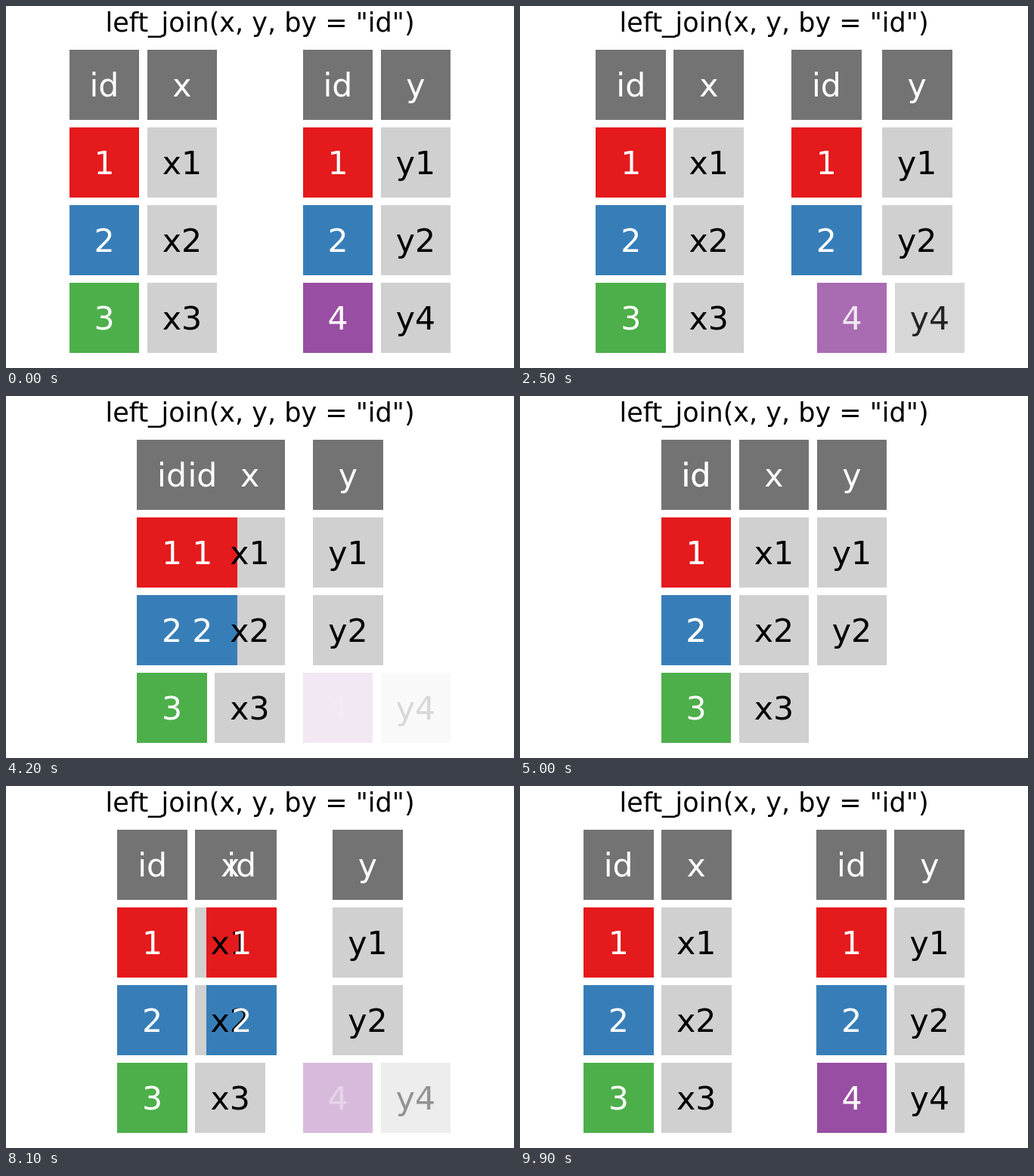
Animation, 672 px wide and 480 px high, one loop 10 s. Source, as an HTML page:

```html
<!DOCTYPE html>
<html lang="en">
<head>
<meta charset="utf-8">
<title>Left join</title>
<style>
  html, body { margin: 0; width: 100%; height: 100%; overflow: hidden; background: #fff; }
  svg { display: block; width: 672px; height: 480px; }
  text { font: 42.68px "DejaVu Sans", sans-serif; text-anchor: middle; }
  .title { font-size: 35px; }
  rect { shape-rendering: crispEdges; }
</style>
</head>
<body>
<svg viewBox="0 0 672 480">
  <text class="title" x="336" y="34">left_join(x, y, by = "id")</text>
  <g id="tiles"></g>
  <g id="labels"></g>
</svg>
<script>
const PITCH = 103, SIZE = 92.7, LEFT = 83.65, TOP = 58;
const STEP = 100, STEPS = 100;
const HEAD = '#737373', CELL = '#d0d0d0';
const KEYS = { 1: '#e41a1c', 2: '#377eb8', 3: '#4daf4a', 4: '#984ea3' };

// slot: starting column, move: columns travelled during the join
const columns = [
  { slot: 0, move: 1, rows: ['id', '1', '2', '3'] },
  { slot: 1, move: 1, rows: ['x', 'x1', 'x2', 'x3'] },
  { slot: 3, move: -2, rows: ['id', '1', '2', '4'] },
  { slot: 4, move: -1, rows: ['y', 'y1', 'y2', 'y4'] }
];

function add(parent, tag, attrs) {
  const el = document.createElementNS('http://www.w3.org/2000/svg', tag);
  for (const name in attrs) el.setAttribute(name, attrs[name]);
  return document.getElementById(parent).appendChild(el);
}

function makeCell(label, row, { slot, move }) {
  const y = TOP + row * PITCH;
  const fill = row === 0 ? HEAD : KEYS[label] || CELL;
  const tile = add('tiles', 'rect', { y, height: 93, fill });
  const text = add('labels', 'text', { y: y + 62, fill: fill === CELL ? '#000' : '#fff' });
  text.textContent = label;
  return { tile, text, slot, move, fades: label.endsWith('4') };
}

const cells = columns.flatMap(col => col.rows.map((label, row) => makeCell(label, row, col)));

const ease = t => (1 - Math.cos(Math.PI * Math.min(1, Math.max(0, t)))) / 2;

// 0 = separate tables, 1 = joined table
function joined(step) {
  return step < 60 ? ease((step - 16) / 34) : 1 - ease((step - 67) / 33);
}

function draw(p) {
  for (const { tile, text, slot, move, fades } of cells) {
    const x = LEFT + PITCH * (slot + (fades ? 0 : move * p));
    const left = Math.round(x);
    tile.setAttribute('x', left);
    tile.setAttribute('width', Math.round(x + SIZE) - left);
    text.setAttribute('x', x + SIZE / 2);
    if (fades) {
      tile.setAttribute('opacity', 1 - p);
      text.setAttribute('opacity', 1 - p);
    }
  }
}

let start, last;
function tick(now) {
  start ??= now;
  const step = Math.floor((now - start) / STEP) % STEPS;
  if (step !== last) draw(joined(last = step));
  requestAnimationFrame(tick);
}

draw(0);
requestAnimationFrame(tick);
</script>
</body>
</html>
```
